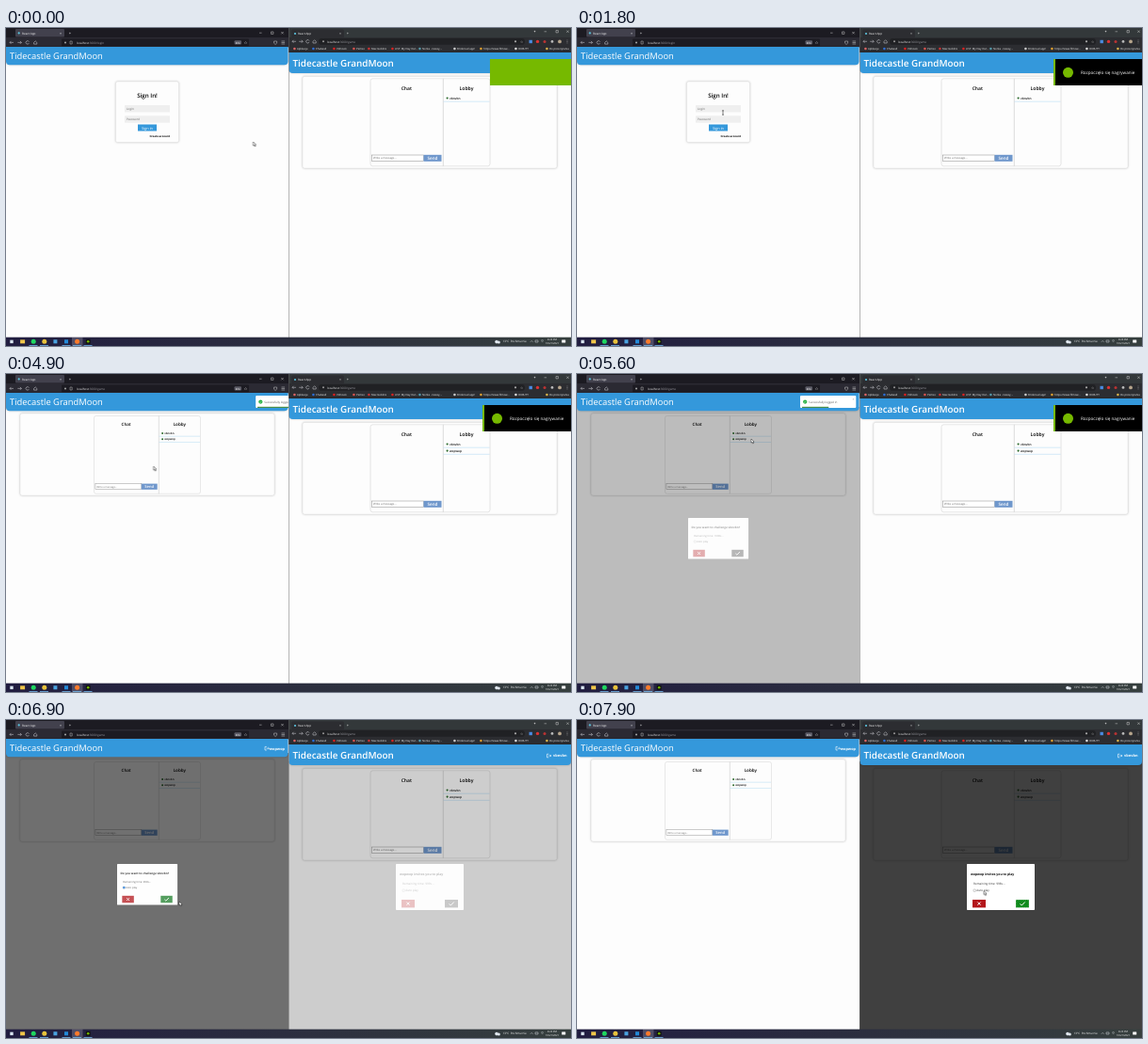
Write an HTML page that moves like this. It is 600 by 338 pixels and loops after 8 s.

```html
<!DOCTYPE html>
<html lang="en">
<head>
<meta charset="utf-8">
<title>Two player lobby</title>
<style>
html, body { margin: 0; width: 100%; height: 100%; overflow: hidden; background: #fdfdfd; }
#stage { display: block; width: 600px; height: 338px; }
text { font-family: "Open Sans", "Noto Sans", sans-serif; text-rendering: geometricPrecision; white-space: pre; }
.b { font-weight: 600; }
.bb { font-weight: 700; }
.mid { text-anchor: middle; }
.end { text-anchor: end; }
.w { fill: #fff; }
.soft { filter: drop-shadow(0 0 1.2px rgba(0, 0, 0, .22)); }

/* one shared 8 s clock: 1.25% = 100 ms */
.a { animation: 8s linear infinite; }
.step { animation-timing-function: step-end; }

.login { animation-name: login; }
@keyframes login { 0% { visibility: visible } 57.5%, 100% { visibility: hidden } }
.joined { animation-name: joined; }
@keyframes joined { 0% { visibility: hidden } 57.5%, 100% { visibility: visible } }
.focus1 { animation-name: focus1; }
@keyframes focus1 { 0% { visibility: hidden } 25% { visibility: visible } 46.25%, 100% { visibility: hidden } }
.focus2 { animation-name: focus2; }
@keyframes focus2 { 0% { visibility: hidden } 46.25% { visibility: visible } 57.5%, 100% { visibility: hidden } }
.hint1 { animation-name: hint1; }
@keyframes hint1 { 0% { opacity: 1 } 31.25%, 100% { opacity: 0 } }
.hint2 { animation-name: hint2; }
@keyframes hint2 { 0% { opacity: 1 } 47.5%, 100% { opacity: 0 } }
.type1 { animation-name: type1; }
@keyframes type1 {
  0%, 31.24% { clip-path: inset(0 100% 0 0) }
  31.25% { clip-path: inset(0 83% 0 0); animation-timing-function: steps(5) }
  37.5%, 100% { clip-path: inset(0) }
}
.type2 { animation-name: type2; }
@keyframes type2 {
  0%, 47.49% { clip-path: inset(0 100% 0 0) }
  47.5% { clip-path: inset(0 83% 0 0); animation-timing-function: steps(5) }
  53.75%, 100% { clip-path: inset(0) }
}

.hello { animation-name: hello; }
@keyframes hello {
  0%, 58.75% { transform: translateX(66px); animation-timing-function: ease-out }
  65%, 83.1% { transform: none; animation-timing-function: ease-in }
  85.8%, 100% { transform: translateX(66px) }
}
.bar { animation-name: bar; transform-origin: 239px 0; }
@keyframes bar { 0%, 57.5% { transform: none } 82.5%, 100% { transform: scaleX(0) } }

.fadeL { animation-name: fadeL; }
@keyframes fadeL { 0%, 68.3% { opacity: 0 } 73.3%, 85% { opacity: 1 } 90%, 100% { opacity: 0 } }
.fadeR { animation-name: fadeR; }
@keyframes fadeR { 0%, 85% { opacity: 0 } 90%, 100% { opacity: 1 } }
.okL { animation-name: okL; }
@keyframes okL { 0% { fill: #333 } 73.3%, 100% { fill: #1c7f2a } }
.okR { animation-name: okR; }
@keyframes okR { 0% { fill: #333 } 90%, 100% { fill: #0f8a1c } }
.tick { animation-name: tick; }
@keyframes tick { 0% { visibility: hidden } 78.1%, 100% { visibility: visible } }
.beforeL { animation-name: beforeL; }
@keyframes beforeL { 0% { visibility: visible } 81.25%, 100% { visibility: hidden } }
.afterL { animation-name: afterL; }
@keyframes afterL { 0% { visibility: hidden } 81.25%, 100% { visibility: visible } }
.beforeR { animation-name: beforeR; }
@keyframes beforeR { 0% { visibility: visible } 95%, 100% { visibility: hidden } }
.afterR { animation-name: afterR; }
@keyframes afterR { 0% { visibility: hidden } 95%, 100% { visibility: visible } }

.green { animation-name: green; }
@keyframes green {
  0% { transform: translateX(8px) }
  1.9%, 75.4% { transform: none }
  76.25% { transform: translateX(5px) }
  78% { transform: translateX(35px) }
  80%, 100% { transform: translateX(95px) }
}
.black { animation-name: black; }
@keyframes black {
  0%, 1.25% { transform: translateX(93px); animation-timing-function: ease-out }
  7.5%, 71.9% { transform: none; animation-timing-function: ease-in }
  75.4%, 100% { transform: translateX(93px) }
}
.notice { animation-name: notice; }
@keyframes notice { 0%, 8% { opacity: 0 } 11.25%, 100% { opacity: 1 } }

.cursor { animation-name: cursor; animation-timing-function: ease-in-out; }
@keyframes cursor {
  0%, 12.5% { transform: translate(262.5px, 121px) }
  20%, 23.75% { transform: translate(155px, 90px) }
  28.1%, 35% { transform: translate(157px, 103px) }
  41.25%, 46.25% { transform: translate(138px, 100px) }
  52.5%, 58.75% { transform: translate(148px, 107px) }
  66.25%, 70% { transform: translate(185px, 69px) }
  75%, 79.4% { transform: translate(130px, 179px) }
  83.1%, 84.4% { transform: translate(171px, 190px) }
  86.25% { transform: translate(184px, 193px) }
  93.75% { transform: translate(436px, 186px) }
  96.25%, 100% { transform: translate(432px, 181.5px) }
}
.arrow { animation-name: arrow; }
@keyframes arrow { 0% { visibility: visible } 18.75% { visibility: hidden } 57.5%, 100% { visibility: visible } }
.beam { animation-name: beam; }
@keyframes beam { 0% { visibility: hidden } 18.75% { visibility: visible } 57.5%, 100% { visibility: hidden } }
</style>
</head>
<body>
<svg id="stage" viewBox="0 0 600 338"></svg>
<script>
const TITLE = 'Tidecastle GrandMoon', HOST = 'vbnvbn', GUEST = 'wopwop';
const BLUE = '#3498db';

const box = (x, y, w, h, fill, more = '') =>
  `<rect x="${x}" y="${y}" width="${w}" height="${h}" fill="${fill}" ${more}/>`;
const dot = (x, y, r, fill) => `<circle cx="${x}" cy="${y}" r="${r}" fill="${fill}"/>`;
const line = (d, color, width = .5, more = '') =>
  `<path d="${d}" fill="none" stroke="${color}" stroke-width="${width}" ${more}/>`;
const label = (x, y, size, str, cls = '', fill = '') =>
  `<text x="${x}" y="${y}" font-size="${size}" class="${cls}" ${fill && `fill="${fill}"`}>${str}</text>`;
const anim = (names, inner) => `<g class="a ${names}">${inner}</g>`;

// back, forward, reload, home
const navIcons = (x, y, gap) => line(
  `M${x + 2} ${y}h-4l1.5-1.5m-1.5 1.5l1.5 1.5 M${x + gap - 2} ${y}h4l-1.5-1.5m1.5 1.5l-1.5 1.5
   M${x + 2 * gap + 1.6} ${y - .6}a1.7 1.7 0 1 0 0 1.2 M${x + 3 * gap - 1.6} ${y}l1.6-1.6l1.6 1.6v1.7h-3.2z`, '#d5d5da');

const url = (x, y, page) =>
  label(x, y, 3.1, `localhost<tspan fill="#9a9aa2">:3000/${page}</tspan>`, '', '#f2f2f4');

const header = (x, y, w, h, size, base, cls) =>
  `<path class="soft" d="M${x} ${y}h${w}v${h - 4}q0 4-4 4h${8 - w}q-4 0-4-4z" fill="${BLUE}"/>` +
  label(x + 4, base, size, TITLE, cls);

const logout = (x, y, name) =>
  line(`M${x + 1.8} ${y - 1.8}h-1.8v3.6h1.8 M${x + 1.5} ${y}h3l-1.1-1.1m1.1 1.1l-1.1 1.1`, '#fff', .6) +
  label(x + 21, y + 1.3, 3.9, name, 'w bb end');

const member = (y, name) =>
  dot(81.6, y, 1.1, '#2c6a2c') + label(84, y + 1.1, 3.2, name, 'b') + line(`M77.5 ${y + 3.7}h49`, '#a9d5f2');

const chat = (x, y, scale) => `<g transform="translate(${x} ${y}) scale(${scale})">` +
  box(0, 0, 127, 93, '#fdfdfd', 'rx="2.5" stroke="#d6d6d6" stroke-width=".6"') +
  line('M77.3 0v93', '#c4c4c4', .6) +
  label(38.3, 11.8, 5, 'Chat', 'b mid') + label(102, 11.8, 5.1, 'Lobby', 'b mid') +
  member(20.7, HOST) + anim('step joined', member(27.8, GUEST)) +
  box(1.6, 81.2, 55, 6.6, '#fff', 'stroke="#8a8a8a" stroke-width=".5"') +
  label(3, 85.7, 2.9, 'Write a message...', '', '#666') +
  box(56.5, 81, 19, 7, '#6f97cc') + label(66, 86.1, 4.6, 'Send', 'w b mid') + '</g>';

const card = (x, y, w, h) =>
  box(x, y, w, h, '#fdfdfd', 'rx="2" class="soft" stroke="#dcdcdc" stroke-width=".4"');

const dialog = (side, x, scale, w, h, title, times) => {
  const time = n => label(7, 22, 3.1, `Remaining time: ${n}s...`, '', '#333');
  return `<g transform="translate(${x} 153) scale(${scale})">` +
    box(0, 0, w, h, '#fff', 'rx=".8"') + label(4, 12.3, 3.4, title, 'bb') +
    anim('step before' + side, time(times[0])) + anim('step after' + side, time(times[1])) +
    box(7, 27, 2.4, 2.4, '#fff', 'rx=".4" stroke="#777" stroke-width=".35"') +
    (side === 'L' ? anim('step tick', box(6.9, 26.9, 2.6, 2.6, '#1b76d8', 'rx=".4"')) : '') +
    label(10.3, 29.3, 3.1, 'Auto play', '', '#333') +
    box(6, 38, 14, 8.4, '#b3161b') + line('M11.4 40.6l3.2 3.2m0-3.2l-3.2 3.2', '#fff', 1) +
    `<rect class="a step ok${side}" x="52" y="38" width="14" height="8.4"/>` +
    line('M56.6 42.4l1.7 1.7l3.4-3.6', '#fff', 1) +
    (side === 'R' ? anim('step afterR', line('M52 38h14v8.4h-14z', '#d8e8d8', .5, 'stroke-dasharray="1.4 1"')) : '') +
    '</g>';
};

const field = (y, n, hint, typed) =>
  box(126, y, 48, 7.6, '#efefef', 'rx=".6"') +
  anim('step focus' + n, box(126, y, 48, 7.6, '#f2f6fa', 'rx=".8" stroke="#8ec3ee" stroke-width="1"')) +
  anim('step hint' + n, label(128, y + 4.9, 3.1, hint, '', '#666')) +
  `<text class="a type${n}" x="128" y="${y + 4.9}" font-size="3.1">${typed}</text>`;

const signIn = card(116.5, 57, 67, 64.5) + label(150, 73.7, 6.2, 'Sign In!', 'b mid') +
  field(82, 1, 'Login', GUEST) + field(93.2, 2, 'Password', '••••••') +
  box(140, 102.5, 20, 7, BLUE) + label(150, 107.5, 3.9, 'Sign in', 'w mid') +
  label(174, 116.2, 2.85, 'Create account', 'bb end');

const hello = anim('hello',
  box(237, 23, 59.3, 13, '#fff', 'rx="1"') + dot(242.2, 29.6, 2.1, '#1fae3c') +
  line('M241.2 29.6l.8.8l1.4-1.5', '#fff', .5) +
  label(246, 30.8, 3, 'Successfully logged in', '', '#555') + label(293.4, 28.4, 3.4, '×', 'mid', '#888') +
  `<rect class="a bar" x="239" y="34.8" width="57" height="1.2" fill="#4a8f4a"/>`);

const leftWindow = `<svg width="300" height="329" viewBox="0 0 300 329">` +
  box(0, 0, 300, 329, '#fdfdfd') + box(0, 0, 300, 10.5, '#1c1b22') + box(0, 10, 300, 10.5, '#2b2a33') +
  box(10, 1, 52, 8.6, '#42414d', 'rx="1"') + dot(13.7, 5.4, 1.1, '#5cc6e0') +
  label(17, 6.5, 3.1, 'React App', 'w') + label(58, 6.6, 3.6, '×', 'w mid') + label(68, 6.8, 4.2, '+', 'w mid') +
  line('M269 5.2h2.6 M281.5 4h2.4v2.4h-2.4z M292.3 4l2.4 2.4m0-2.4l-2.4 2.4', '#ddd', .45) +
  navIcons(6, 15.4, 8.4) + box(59, 11.5, 199, 7.8, '#1c1b22', 'rx="1"') +
  dot(63, 15.5, 1, '#aaa') + line('M68 14h2.2v3h-2.2z', '#ccc', .45) +
  anim('step login', url(75, 16.6, 'login')) + anim('step joined', url(75, 16.6, 'game')) +
  box(242.5, 13.3, 7.5, 4.3, '#5b5b66', 'rx="1"') + label(246.2, 16.6, 2.6, '80%', 'w mid') +
  label(254.5, 17.2, 4.4, '☆', 'w mid') +
  line('M284.6 14h3v2.2l-1.5 1.3l-1.5-1.3z M292.5 14h3.6m-3.6 1.5h3.6m-3.6 1.5h3.6', '#ddd', .45) +
  anim('step login', signIn) +
  anim('step joined', card(15, 42, 270, 87) + chat(93.5, 44.5, .89)) +
  anim('fadeL', box(0, 35, 300, 294, '#000', 'opacity=".75"') +
    dialog('L', 118, .89, 72, 49, `Do you want to challenge ${HOST}?`, [1000, 999])) +
  header(0, 20, 299.5, 19.3, 9.4, 33.4, 'w') +
  anim('step joined', logout(275, 30.2, GUEST)) + hello + '</svg>';

const bookmarks = [
  [309, 'Aplikacje', '#d66'], [329, 'Chatwall', '#2d6fd8'], [351, 'Vidnook', '#e02020'], [372, 'Pemso', '#d9534f'],
  [388, 'Max Goblins', '#c33'], [413, 'LIST: My Day Out...', '#d22'], [442, 'Norka - newsy,...', '#59a'],
  [479, 'Brickroad app!', '#ccc'], [507, 'https://www.filmow...', '#e0a030'], [544, 'OKRUTY', '#ddd'],
  [577, 'Do przeczytania', '#d8b24a']
].map(([x, name, color]) => dot(x - 2.6, 22, 1.3, color) + label(x, 23.1, 2.8, name, '', '#f4f4f4')).join('');

const rightWindow = `<svg x="300" width="300" height="329" viewBox="300 0 300 329">` +
  box(300, 0, 300, 329, '#fdfdfd') + box(300, 0, 300, 11, '#33383a') +
  box(303, 1.6, 56, 9, '#2c2d31', 'rx="1.6"') + box(300, 10, 300, 16, '#2c2d31') +
  dot(307, 6, 1.1, '#5cc6e0') + label(310, 7.1, 3, 'React App', 'w') +
  label(355, 7.2, 3.4, '×', 'w mid') + label(363, 7.4, 4, '+', 'w mid') +
  dot(561.5, 3.6, .8, '#bbb') +
  line('M571.5 3.8h2.6 M584 2.5h2.4v2.4h-2.4z M595.3 2.5l2.4 2.4m0-2.4l-2.4 2.4', '#ddd', .45) +
  navIcons(306, 14.3, 7.2) + box(332, 11, 219, 6.8, '#202124', 'rx="3.4"') +
  dot(337, 14.3, 1, '#999') + url(341, 15.5, 'game') + label(547.5, 15.8, 3.6, '☆', 'w mid') +
  dot(541, 14.3, 1.1, '#aaa') + box(555.5, 12.8, 3.4, 3.4, '#4a8be0') + dot(564.5, 14.4, 1.7, '#d33') +
  dot(572, 14.4, 1.5, '#b33') + dot(580, 14.4, 1.4, '#bbb') + dot(588, 14.4, 1.9, '#b7a58c') +
  [12.9, 14.4, 15.9].map(y => dot(596, y, .4, '#ddd')).join('') +
  bookmarks + card(315, 51.5, 270, 97.5) + chat(387, 53.8, 1) +
  anim('fadeR', box(300, 44, 300, 285, '#000', 'opacity=".75"') +
    dialog('R', 414, 1, 72, 49, `${GUEST} invites you to play`, [999, 998])) +
  header(300.5, 26, 299.5, 22, 9.9, 41.3, 'w b') + logout(574.5, 38, HOST) +
  line('M300.3 0v329', '#666', .6) + '</svg>';

const taskIcons = ['#2f6fa8', '#f0c64a', '#1ed760', '#e8c23c', '#4aa3e0', '#2389d8', '#ff7a2a', '#111']
  .map((color, i) => {
    const x = 6 + i * 11.6;
    if (i === 0) return box(4.3, 331.7, 3.4, 3.4, '#d9e6f0');
    if (i === 1) return box(x - 2.5, 331.4, 5, 3.9, color);
    if (i === 4 || i === 5) return box(x - 2, 331.3, 4, 4, color);
    return i === 7 ? box(x - 2.4, 330.9, 4.8, 4.8, color) + dot(x, 333.3, 1.3, '#76b900') : dot(x, 333.3, 2.5, color);
  }).join('');

const taskbar = '<linearGradient id="dusk"><stop stop-color="#211d40"/><stop offset="1" stop-color="#363f3e"/></linearGradient>' +
  box(0, 328.7, 600, 9.3, 'url(#dusk)') + box(70, 328.7, 11.5, 9.3, '#fff', 'opacity=".2"') + taskIcons +
  [24.5, 36, 59.5, 71, 82.5].map(x => box(x, 337.2, 9, .8, '#76b9ed')).join('') +
  dot(521, 333.6, 1.8, '#dfe6ee') + dot(523.3, 333.9, 1.5, '#dfe6ee') +
  label(527.5, 334.4, 3, '13°C  Pochmurnie', 'w') +
  line('M556.8 333.8l1.4-1.4l1.4 1.4 M562 332h3v2h-3z M568 332.4q1.5-1.4 3 0m-2.2 1.2q.7-.6 1.4 0', '#e4e8ec', .45) +
  label(580, 332.3, 2.7, '8:23 PM', 'w mid') + label(580, 336.2, 2.7, '10/21/2021', 'w mid') +
  box(590.2, 331.4, 4, 3.2, '#fff', 'rx=".4"');

const recording =
  anim('green', box(506, 33, 96, 28, '#76b900')) +
  anim('black', box(508, 33, 94, 28, '#000') +
    anim('notice', dot(521.5, 47.3, 5.5, '#76b900') +
      label(535, 49, 4.6, 'Rozpoczęło się nagrywanie', 'w')));

const cursor = anim('cursor',
  anim('step arrow', `<path d="M0 0v4.2l1-.9l.8 1.7l.8-.4l-.8-1.6h1.3z" fill="#fff" stroke="#111" stroke-width=".45"/>`) +
  anim('step beam', line('M-1-2.2h2m-1 0v4.4m-1 0h2', '#222', .55)));

document.getElementById('stage').innerHTML = leftWindow + rightWindow + taskbar + recording + cursor;
</script>
</body>
</html>
```
